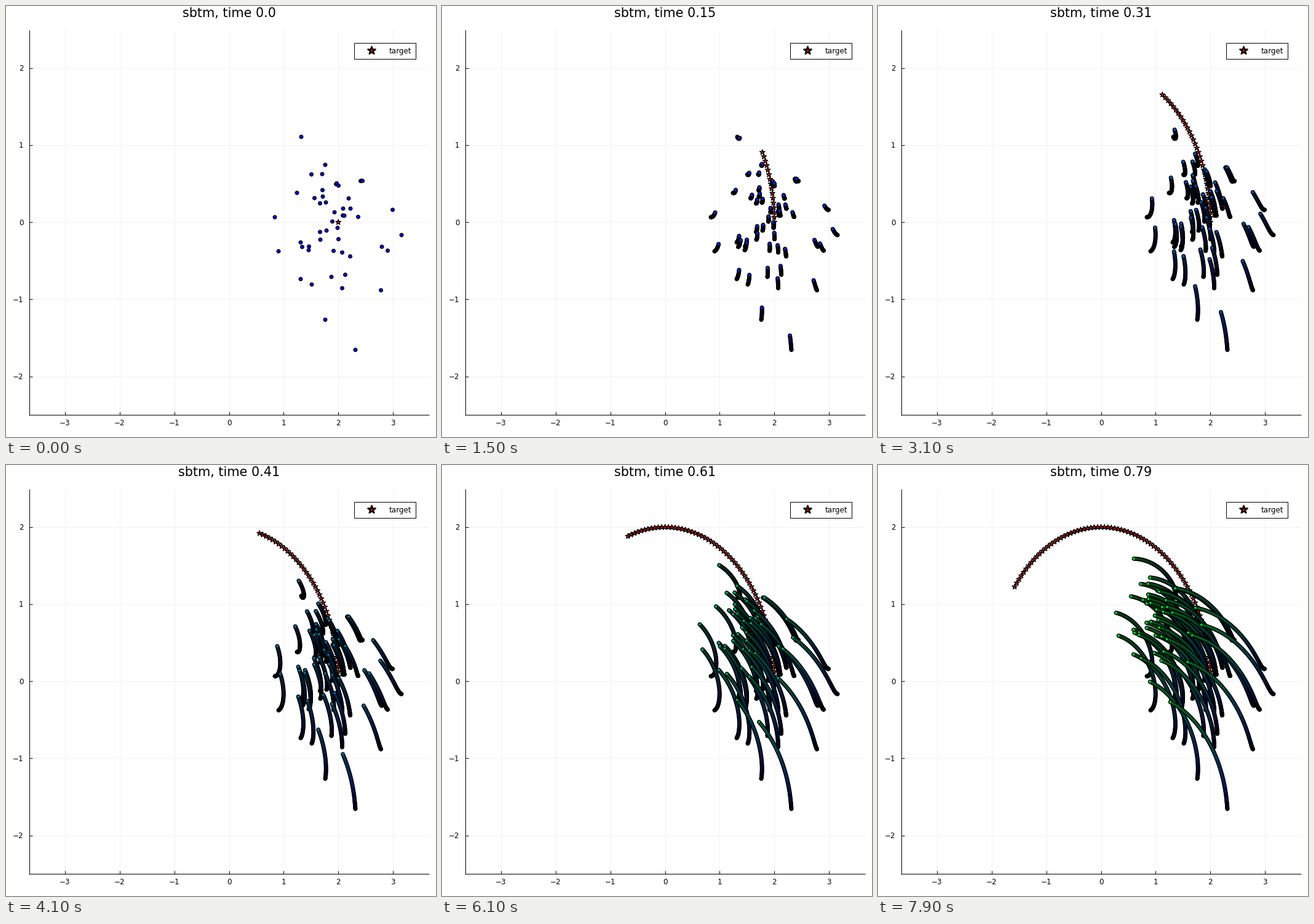
A matplotlib script for the animation above (8 s loop, 699 by 700 pixels).

```python
import numpy as np
import matplotlib.pyplot as plt
from matplotlib.animation import FuncAnimation
from matplotlib.collections import PathCollection
from matplotlib.patches import Rectangle
from matplotlib.path import Path
from matplotlib.transforms import IdentityTransform

W, H, DPI = 699, 700, 128
PX = 72 / DPI                          # points per pixel
ORIGIN = np.array([362.5, 351.2])
UNIT = np.array([88.83, -125.15])      # pixels per data unit
LEFT, RIGHT, TOP, BOTTOM = 38, 687.5, 38.5, 664
STEPS, DT = 80, 0.01

# starting particles, in pixels
START = np.array([
    (480, 212.5), (519, 258), (496.5, 273.5), (514, 273), (536.5, 289.3),
    (537.5, 288), (540.5, 291.7), (576.5, 284.2), (577.5, 283.8), (579.5, 284),
    (514.5, 299), (473, 303.5), (501.5, 312), (515, 309.5), (557, 312.5),
    (510.5, 320.5), (520, 319), (548, 329), (560, 329), (534, 335),
    (547.5, 340.2), (550, 340.5), (572.5, 342.5), (628.5, 331), (437, 343),
    (530.5, 350), (539, 360.3), (521, 364.7), (510.5, 367), (511, 379.5),
    (540.5, 378.7), (479, 384), (481.5, 391.3), (492.5, 390.7), (492, 396.5),
    (443, 398.3), (643, 372), (611, 391), (620.5, 397.3), (532.5, 397.7),
    (546.5, 400.3), (559.5, 406.7), (529, 440), (551.5, 436.5), (546.5, 458.3),
    (479, 443.5), (497, 452.3), (609.5, 461.7), (519, 509.5), (568, 558.5)])


def target(t):
    a = np.pi * t
    return ORIGIN + UNIT * 2 * np.array([np.cos(a), np.sin(a)])


def simulate():
    """Euler steps of particles drawn to the target and repelled by each other."""
    x, points, colors = START.copy(), [], []
    for k in range(STEPS):
        t = k * DT
        goal = target(t)
        points.append(np.vstack([goal, x]))
        colors += [(1, 0, 0)] + [(0, t, 1 - t)] * len(x)
        x = x + DT * (goal - x + 0.5 * (x - x.mean(axis=0)))
    return np.vstack(points), np.array(colors)


def scaled(path, r):
    return Path(path.vertices * r, path.codes)


def line(xs, ys, color="black", width=1.0, z=1):
    ax.plot(xs, ys, color=color, lw=width * PX, zorder=z, solid_capstyle="butt")


def label(x, y, s, size=11.9, ha="center"):
    return ax.text(x, y, s, fontsize=size * PX, ha=ha, va="baseline", zorder=6)


def markers(paths, offsets, colors, width, z):
    marks = PathCollection(
        paths, offsets=offsets, offset_transform=ax.transData,
        facecolors=colors, edgecolors="black", linewidths=width * PX, zorder=z)
    marks.set_transform(IdentityTransform())
    ax.add_collection(marks, autolim=False)
    return marks


plt.rcParams["font.family"] = "DejaVu Sans"
fig = plt.figure(figsize=(W / DPI, H / DPI), dpi=DPI, facecolor="white")
ax = fig.add_axes([0, 0, 1, 1])
ax.set(xlim=(0, W), ylim=(H, 0))
ax.axis("off")

for n in range(-3, 4):
    x = ORIGIN[0] + n * UNIT[0]
    line([x, x], [TOP, BOTTOM], "0.945", z=0)
    line([x, x], [BOTTOM, BOTTOM - 5])
    label(x, 681.2, str(n).replace("-", "\u2212"))
for n in range(-2, 3):
    y = ORIGIN[1] + n * UNIT[1]
    line([LEFT, RIGHT], [y, y], "0.945", z=0)
    line([LEFT, LEFT + 5], [y, y])
    label(28.5, y + 4.3, str(n).replace("-", "\u2212"), ha="right")
line([LEFT, LEFT], [TOP, BOTTOM + 0.5])
line([LEFT - 0.5, RIGHT], [BOTTOM, BOTTOM])

STAR, DOT = Path.unit_regular_star(5, 0.382), Path.unit_circle()
points, colors = simulate()
group = len(START) + 1
trail = markers([scaled(STAR, 4.4)] + [scaled(DOT, 2.8)] * len(START),
                points[:group], colors[:group], 1.35, 3)

ax.add_patch(Rectangle((565.5, 59.5), 100, 26, fc="white", ec="black",
                       lw=PX, zorder=4))
markers([scaled(STAR, 6.6)], [(594, 72.3)], ["red"], 2.3, 5)
label(622.5, 76.7, "target", ha="left")
title = label(362.5, 18, "", 20.8)


def update(k):
    n = group * (k + 1)
    trail.set_offsets(points[:n])
    trail.set_facecolors(colors[:n])
    title.set_text(f"sbtm, time {round(k * DT, 2)}")
    return trail, title


anim = FuncAnimation(fig, update, frames=STEPS, interval=100, repeat=True,
                     repeat_delay=0, init_func=lambda: update(0))
plt.show()
```
